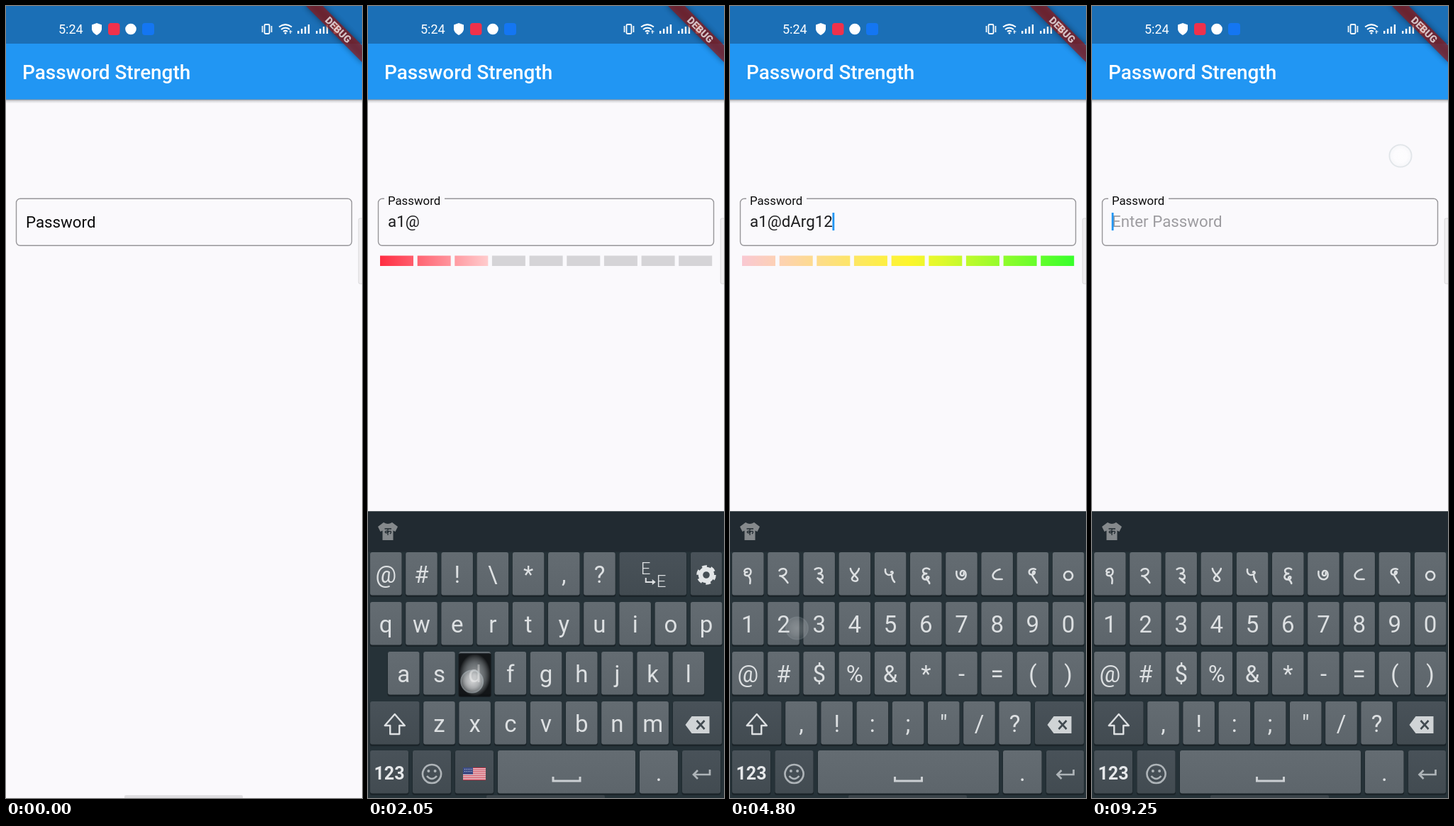
An HTML page that plays this animation: 502x1115 px, repeating every 9.3 s.

```html
<!DOCTYPE html>
<html lang="en">
<head>
<meta charset="utf-8">
<title>Password Strength</title>
<style>
html, body { margin: 0; width: 100%; height: 100%; overflow: hidden; background: #faf9fc; }
svg { display: block; width: 100%; height: 100%; font-family: Roboto, "Noto Sans", sans-serif; }
text { white-space: pre; }
</style>
</head>
<body>
<svg id="stage" viewBox="0 0 502 1115" preserveAspectRatio="none"></svg>
<script>
const LOOP = 9300;
const stage = document.getElementById('stage');
const $ = id => document.getElementById(id);

// ---- drawing helpers ----
const rect = (x, y, w, h, fill, more = '') =>
  `<rect x="${x}" y="${y}" width="${w}" height="${h}" fill="${fill}" ${more}/>`;
const line = (d, color, width, more = '') =>
  `<path d="${d}" fill="none" stroke="${color}" stroke-width="${width}" ${more}/>`;
const text = (x, y, size, fill, str, more = '') =>
  `<text x="${x}" y="${y}" font-size="${size}" fill="${fill}" ${more}>${str}</text>`;
const gradient = (id, stops, more) =>
  `<linearGradient id="${id}" ${more}>` + stops.map(([o, c]) =>
    `<stop offset="${o}" stop-color="${c}"/>`).join('') + '</linearGradient>';
const glow = (id, stops) =>
  `<radialGradient id="${id}">` + stops.map(([o, c, a]) =>
    `<stop offset="${o}" stop-color="${c}" stop-opacity="${a}"/>`).join('') + '</radialGradient>';
const barFill = (id, count, ...stops) => gradient(id, stops,
  `gradientUnits="userSpaceOnUse" x1="17" y1="0" x2="${17 + count * 52.65 - 5.6}" y2="0"`);

const defs = `<defs>
${barFill('weak', 3, [0, '#ff2d42'], [1, '#ffcccd'])}
${barFill('medium', 6, [0, '#f9c8d2'], [.15, '#fdd0b4'], [.9, '#fdf237'], [1, '#fbf82a'])}
${barFill('strong', 9, [0, '#f9c8d2'], [.12, '#fdd2b0'], [.5, '#fdf52c'], [.6, '#dff92c'], [1, '#37ff2b'])}
${gradient('keyFill', [[0, '#646c72'], [1, '#5d656b']], 'x2="0" y2="1"')}
${gradient('darkFill', [[0, '#495259'], [1, '#424b51']], 'x2="0" y2="1"')}
${gradient('drop', [[0, '#7d8287'], [.4, '#d2d2d6'], [1, '#faf9fc']], 'x2="0" y2="1"')}
${glow('pressFill', [[0, '#c4c4c4', .55], [.55, '#6b6e70', .6], [1, '#0c0e10', .92]])}
${glow('touchFill', [[0, '#fff', .85], [.6, '#fff', .6], [1, '#eef2f3', .35]])}
<filter id="blur" x="-20%" y="-60%" width="140%" height="220%"><feGaussianBlur stdDeviation="4"/></filter>
</defs>`;

// ---- status bar, app bar, banner ----
const signal = x => [4, 7, 10, 13].map((h, i) =>
  rect(x + i * 4.9, 39 - h, 2.4, h, '#fff')).join('');
const wifi = [[9, 29.5], [6, 33], [3, 36]].map(([r, y]) =>
  line(`M${394 - r} ${y}Q394 ${y - r * .75} ${394 + r} ${y}`, '#fff', 2)).join('');

const header = rect(0, 131, 502, 6, 'url(#drop)') +
  rect(0, 0, 502, 53.5, '#1b6fb6') + rect(0, 53, 502, 78.5, '#2196f3') +
  text(74, 38.5, 18, '#fff', '5:24') +
  '<path d="M128 24L135 26.5V32C135 36 132 39 128 41C124 39 121 36 121 32V26.5Z" fill="#fff"/>' +
  rect(144, 24, 16.5, 17, '#f0314b', 'rx="4"') +
  '<circle cx="176" cy="32.5" r="7.8" fill="#fff"/>' +
  rect(192, 24, 17, 17, '#1476f2', 'rx="4"') +
  rect(364.5, 26, 7, 13, 'none', 'rx="1.5" stroke="#fff" stroke-width="1.8"') +
  line('M361.5 28v9M374.5 28v9', '#fff', 1.6) +
  wifi + '<circle cx="394" cy="38.3" r="1.4" fill="#fff"/>' +
  line('M401 34v5M399.5 36h4', '#fff', 1.2) +
  signal(411) + signal(437) + rect(462, 25, 8, 14, '#fff', 'rx="1.5"') +
  text(23, 102.5, 27.9, '#fff', 'Password Strength', 'font-weight="500"');

const banner = '<g transform="translate(502 0) rotate(45)">' +
  rect(-58, 39, 116, 16.8, '#000', 'opacity=".45" filter="url(#blur)"') +
  rect(-58, 39, 116, 16.8, '#b71c1c', 'opacity=".63"') +
  rect(-58, 39, 116, 16.8, '#000', 'opacity=".12"') +
  text(0, 52.4, 14.2, '#fff', 'DEBUG', 'font-weight="900" text-anchor="middle" opacity=".72"') + '</g>';

// ---- password field ----
const field = line('', '#97969a', 1.4, 'id="border"') +
  text(28, 311, 22.3, '#9d9ca0', 'Enter Password', 'id="hint"') +
  text(28, 312, 22.3, '#0c0c0d', 'Password', 'id="label"') +
  '<text id="input" x="28" y="311" font-size="22.3" fill="#1c1c1e"><tspan id="plain"></tspan>' +
  '<tspan id="composing" text-decoration="underline"></tspan></text>' +
  rect(0, 291, 2.8, 25, '#2196f3', 'id="caret"') +
  '<g id="bars">' + Array.from({ length: 9 }, (_, i) =>
    rect((17 + i * 52.65).toFixed(1), 351.5, 47, 14.5, '#d5d4d7')).join('') + '</g>' +
  rect(497.2, 299, 8, 92, '#f0eff1', 'rx="2" stroke="#d9d8da" stroke-width="1"');

// ---- keyboard ----
const INK = '#dde0e2';
const rowY = [769, 839, 909, 979, 1048];
const keys = {};
const digits = [
  'M-1-4C-5-5-6 1-2 1C6 1 6-9 0-9C-3-9-5-7-5-5M0 1C3 3 4 7 3 12',
  'M-6-6C-4-10 5-10 4-4C3 1-3 2-6 1C0 2 2 6 6 11',
  'M-6-8C-2-11 4-10 4-6C4-2 0-2-2-2C3-2 6 0 5 4C4 7-1 6-3 4C0 6 2 9 5 11',
  'M-6-9C-5-3 0 0 4 5C6 10-4 10-4 5C-2 0 5-3 6-9',
  'M-7-8C-8 0-2 1 2-1C5-3 3-6 1-4M2-1C2 4 4 8 6 10',
  'M5-8C1-11-5-9-4-5C-4-2 0-2 2-2C-4-2-6 2-4 5C-1 8 5 6 4 3C2 1-1 4 2 7C4 9 5 10 5 12',
  'M-7-5C-8 4-3 7 2 6C8 4 7-6 2-6C-2-6-3 1 1 1C3 1 4-1 3-3',
  'M4-8C-4-6-8 0-5 4C-3 7 2 6 7 6',
  'M4-8C0-10-6-8-5-3C-4 1 3 0 3-4C2-6 0-5 0-3M-1 0C1 4 4 8 6 11',
  'M0-5A6 6 0 1 0 .1-5Z'
];

function key(layer, name, x, row, w, dark, art) {
  const y = rowY[row], cx = x + w / 2;
  keys[layer + name] = { x, y, w, cx, cy: y + 31 };
  return rect(x - .5, y + 1, w + 1, 62, '#1b2429', 'rx="3"') +
    rect(x, y, w, 60.5, `url(#${dark ? 'darkFill' : 'keyFill'})`, 'rx="3"') +
    (art ? `<g transform="translate(${cx} ${y + 32})">${art}</g>`
         : text(cx, y + 43, 33, INK, name, 'text-anchor="middle"'));
}
const keyRow = (layer, chars, x, row) => [...chars].map((c, i) =>
  key(layer, c, x + i * 50.2, row, 44.5)).join('');

const gear = '<g fill="none" stroke="#e3e6e8"><circle r="8" stroke-width="6.4"/>' +
  '<circle r="11.6" stroke-width="4.4" stroke-dasharray="6.6 5.55"/></g>';
const lang = text(-17, -1, 24, INK, 'E', 'font-weight="300"') + text(5, 17, 24, INK, 'E', 'font-weight="300"') +
  line('M-10 4V10H0', INK, 2) + `<path d="M-1 6L4 10L-1 14Z" fill="${INK}"/>`;
const shift = on => `<path d="M0-14L14 2H6.5V14H-6.5V2H-14Z" fill="${on ? '#dde0e2' : 'none'}" ` +
  'stroke="#dde0e2" stroke-width="2.4" stroke-linejoin="round"/>';
const erase = '<path d="M-17 1L-8-11H17V13H-8Z" fill="#d0d4d6"/>' + line('M-1-5L10 7M10-5L-1 7', '#414a50', 2.6);
const smile = line('M0-12A13 13 0 1 0 .1-12ZM-7 4Q0 12 7 4', '#aeb4b8', 2.6) +
  '<g fill="#aeb4b8"><circle cx="-4.6" cy="-3" r="2"/><circle cx="4.6" cy="-3" r="2"/></g>';
const space = line('M-19 5V11H19V5', '#ccd0d3', 3);
const enter = line('M12-5V2H-11M-5-4L-11 2L-5 8', '#aeb4b8', 2.7);
const num = text(0, 9, 25, '#e6e8ea', '123', 'font-weight="700" text-anchor="middle"');
const flag = rect(-16, -8, 32, 18, '#f2eef0') +
  Array.from({ length: 7 }, (_, i) => rect(-16, -8 + i * 2.77, 32, 1.4, '#c9364a')).join('') +
  rect(-16, -8, 14, 9.7, '#3c4c86') +
  line('M-14-5.5H-3M-14-2.5H-3', '#c5cbe0', 1, 'stroke-dasharray="1 1.4"');

function letters(layer, upper) {
  const c = s => upper ? s.toUpperCase() : s;
  return keyRow(layer, '@#!\\*,?', 3, 0) + key(layer, 'lang', 354.5, 0, 94.5, 1, lang) +
    key(layer, 'gear', 455, 0, 44, 1, gear) +
    keyRow(layer, c('qwertyuiop'), 3, 1) + keyRow(layer, c('asdfghjkl'), 28, 2) +
    key(layer, 'shift', 3, 3, 69.5, 1, shift(upper)) + keyRow(layer, c('zxcvbnm'), 78.2, 3) +
    key(layer, 'erase', 430, 3, 69, 1, erase) +
    key(layer, '123', 3, 4, 54, 1, num) + key(layer, 'smile', 63, 4, 54, 1, smile) +
    key(layer, 'flag', 123, 4, 54, 1, flag) + key(layer, 'space', 183, 4, 194, 0, space) +
    key(layer, '.', 383, 4, 54) + key(layer, 'enter', 443, 4, 54, 1, enter);
}
const numbers = digits.map((d, i) => key('n', 'd' + i, 3 + i * 50.2, 0, 44.5, 0,
    line(d, INK, 2.5, 'stroke-linecap="round"'))).join('') +
  keyRow('n', '1234567890', 3, 1) +
  [...'@#$%&*-=()'].map((c, i) => key('n', c, 3 + i * 50.2, 2, 44.5, 0,
    c === '&' ? text(0, 11, 33, INK, '&amp;', 'text-anchor="middle"') : '')).join('') +
  key('n', 'shift', 3, 3, 69.5, 1, shift(false)) + keyRow('n', ',!:;"/?', 78.2, 3) +
  key('n', 'erase', 430, 3, 69, 1, erase) +
  key('n', '123', 3, 4, 54, 1, num) + key('n', 'smile', 63.5, 4, 54, 1, smile) +
  key('n', 'space', 124, 4, 255, 0, space) + key('n', '.', 385, 4, 54.5) +
  key('n', 'enter', 446, 4, 53, 1, enter);

const shirt = '<g id="shirt"><path d="M22 727Q28 731 34 727L42 733L38.5 740L35.5 738.5V752H20.5V738.5L17.5 740L14 733Z" fill="#85898c"/>' +
  line('M23.5 736H33M28 736V745M28 740C23 737 23 744 28 741C32 737 34 741 31 743', '#222b31', 1.3) + '</g>';

const keyboard = '<g id="keyboard">' + rect(0, 711.5, 502, 404, '#263238') +
  rect(0, 711.5, 502, 57, '#212a31') + shirt + '<g id="words"></g>' +
  `<g id="layerA">${letters('a', false)}</g><g id="layerU">${letters('u', true)}</g><g id="layerN">${numbers}</g>` +
  rect(0, 0, 0, 60, 'url(#pressFill)', 'id="press" stroke="#15191c" stroke-width="1.5" rx="2"') + '</g>';

stage.innerHTML = defs + rect(0, 0, 502, 1115, '#faf9fc') + header + field + keyboard +
  rect(167, 1111, 167, 8, '#dfdee1', 'id="home" rx="2"') +
  '<circle id="touch" r="15.6" fill="url(#touchFill)" stroke="#c3ced2" stroke-opacity=".6" stroke-width="1.8"/>' + banner;

// ---- timeline ----
const FOCUS = 120;
// time, value, start of the composing part
const edits = [[0, ''], [550, 'a', 0], [1380, 'a1'], [1530, 'a1@'], [2150, 'a1@d', 3], [2480, 'a1@dA', 3],
  [2650, 'a1@dAr', 3], [3550, 'a1@dArg', 3], [4550, 'a1@dArg1'], [4740, 'a1@dArg12'], [5000, 'a1@dArg12@']];
const eraseTimes = [5850, 6050, 6250, 6450, 6700, 6850, 6950, 7050, 7150, 7250];
eraseTimes.forEach((t, i) => edits.push([t, 'a1@dArg12@'.slice(0, 9 - i)]));

const layers = [[0, 'a'], [1220, 'n'], [1850, 'a'], [2330, 'u'], [2480, 'a'], [4350, 'n']];
const guesses = [[0, ''], [550, 'a a an and avoden andere anders'], [1220, ''],
  [2150, 'd do day did down does done'], [2480, 'dA day data date days dark'],
  [2650, 'dAr dark darkness darkened darker'], [3550, 'dArg dare darling dart darker dared'], [4350, '']];

const taps = [{ t: 40, x: 330, y: 303 }, { t: 9000, x: 435, y: 211, hold: 400 }];
function tap(t, layer, name, dx = -4, dy = 9) {
  const k = keys[layer + name];
  taps.push({ t, x: k.cx + dx, y: k.cy + dy, key: name.length === 1 ? k : null });
}
tap(450, 'a', 'a');
tap(1150, 'a', '123', 0, 0);
tap(1280, 'n', '1');
tap(1430, 'n', '@', 2, 6);
tap(1760, 'n', '123', 0, 0);
tap(2040, 'a', 'd', -4, 11);
tap(2260, 'a', 'shift', 0, 2);
tap(2390, 'u', 'A');
tap(2550, 'a', 'r', 4, 6);
tap(3450, 'a', 'g');
tap(4260, 'a', '123', 0, 0);
tap(4450, 'n', '1', 6, 6);
tap(4640, 'n', '2', 19, 6);
tap(4900, 'n', '@', 4, 6);
eraseTimes.forEach(t => tap(t - 100, 'n', 'erase', 8, -3));
taps.sort((a, b) => a.t - b.t);

const clamp = v => Math.max(0, Math.min(1, v));
const ease = (t, from, to) => 1 - Math.pow(1 - clamp((t - from) / (to - from)), 3);
const last = (list, t) => list.reduce((found, item) => item[0] <= t ? item : found, list[0]);
const show = (id, on) => $(id).setAttribute('display', on ? 'inline' : 'none');
const set = (id, attrs) => { for (const k in attrs) $(id).setAttribute(k, attrs[k]); };

let shownWords = null;
function drawWords(list) {
  if (list === shownWords) return;
  shownWords = list;
  const box = $('words');
  box.innerHTML = '';
  let x = 10;
  (list ? list.split(' ') : []).forEach((word, i) => {
    if (i) box.insertAdjacentHTML('beforeend', line(`M${x - 10.3} 723V756`, '#6d7478', 1.2));
    box.insertAdjacentHTML('beforeend', text(x, 752, 30, i ? '#e1e4e6' : '#8e959a', word,
      i === 1 ? 'font-weight="700"' : ''));
    x += box.lastElementChild.getComputedTextLength() + 20.6;
  });
}

function drawField(t) {
  const [time, value, from = value.length] = last(edits, t);
  const lift = ease(t, FOCUS, 300);
  set('border', { d: `M${23 + 85 * lift} 271.3H482A5.5 5.5 0 0 1 487.5 276.8V331.8A5.5 5.5 0 0 1 482 337.3` +
    'H20A5.5 5.5 0 0 1 14.5 331.8V276.8A5.5 5.5 0 0 1 20 271.3H23' });
  set('label', { y: 312 - 32 * lift, 'font-size': 22.3 - 5.5 * lift });
  set('hint', { opacity: value ? 0 : lift });
  $('plain').textContent = value.slice(0, from);
  $('composing').textContent = value.slice(from);

  const since = t - Math.max(time, FOCUS);
  show('caret', since >= 0 && since % 1000 < 500);
  set('caret', { x: 27.7 + (value ? $('input').getComputedTextLength() : 0) });

  const size = value.length;
  const [lit, fill] = size < 6 ? [3, 'weak'] : size < 8 ? [6, 'medium'] : [9, 'strong'];
  show('bars', size > 0);
  [...$('bars').children].forEach((bar, i) =>
    bar.setAttribute('fill', i < lit ? `url(#${fill})` : '#d5d4d7'));
}

function drawKeyboard(t) {
  const up = ease(t, 150, 380);
  set('keyboard', { transform: `translate(0 ${404 * (1 - up)})` });
  set('home', { fill: up > .1 ? '#3b444a' : '#dfdee1' });
  const layer = last(layers, t)[1];
  show('layerA', layer === 'a');
  show('layerU', layer === 'u');
  show('layerN', layer === 'n');
  const list = last(guesses, t)[1];
  show('shirt', !list);
  drawWords(list);
}

function drawTouch(t) {
  const now = taps.filter(p => p.t <= t).pop();
  const age = now ? t - now.t : 1e4;
  const alpha = now ? 1 - clamp((age - (now.hold || 100)) / 100) : 0;
  show('touch', alpha > 0);
  if (alpha > 0) set('touch', { cx: now.x, cy: now.y, opacity: alpha * .75 });
  const pressed = now && now.key && age < 100;
  show('press', pressed);
  if (pressed) set('press', { x: now.key.x, y: now.key.y + 3, width: now.key.w });
}

function render(t) {
  drawField(t);
  drawKeyboard(t);
  drawTouch(t);
}

const start = performance.now();
function tick() {
  render((performance.now() - start) % LOOP);
  requestAnimationFrame(tick);
}
tick();
</script>
</body>
</html>
```
